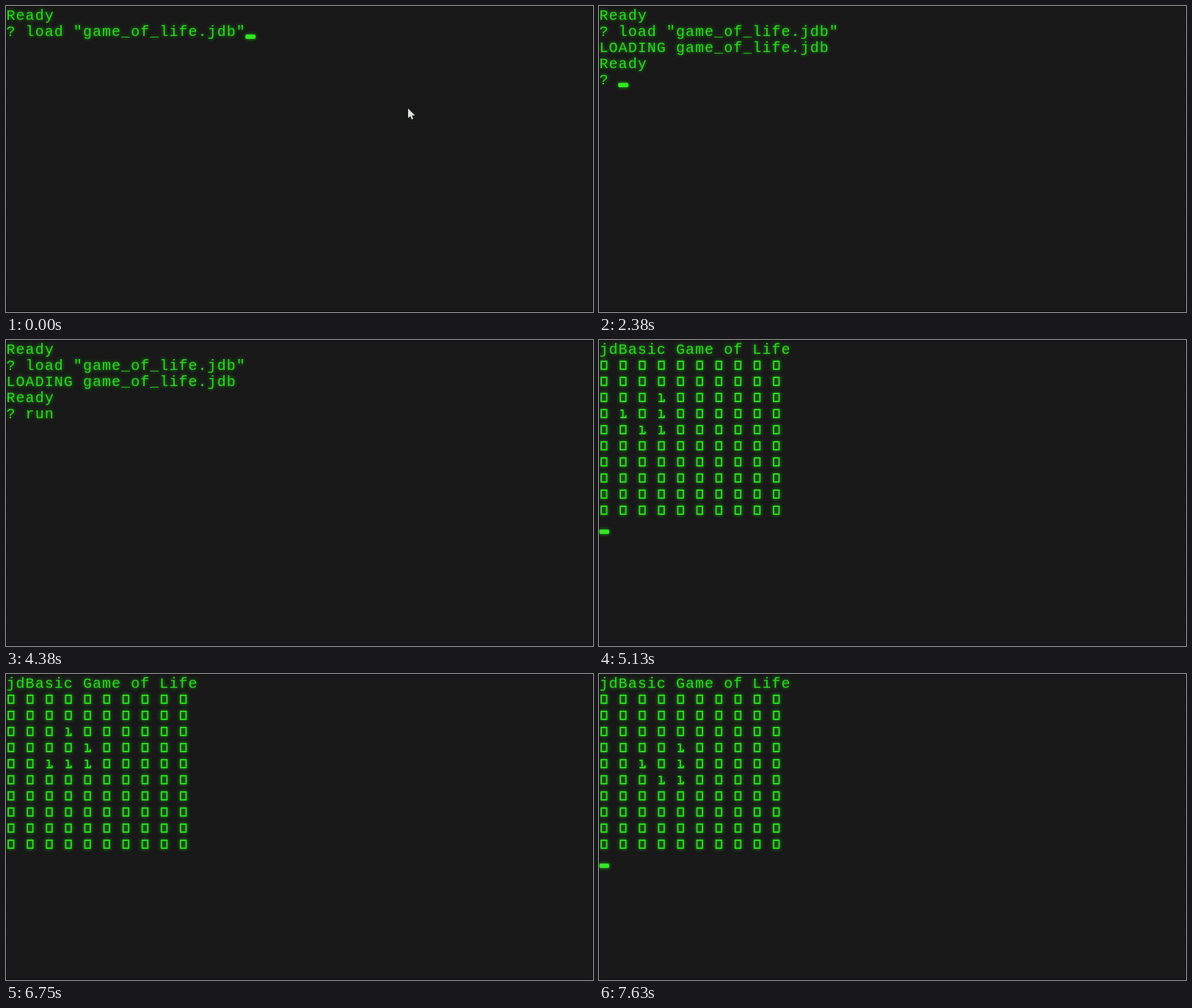
Animation, 800 px wide and 418 px high, one loop 8000 ms. Source, as an HTML page with a canvas:

```html
<!DOCTYPE html>
<html lang="en">
<head>
<meta charset="utf-8">
<title>Game of Life terminal</title>
<style>
html, body { margin: 0; width: 100%; height: 100%; overflow: hidden; background: #181818; }
canvas { display: block; }
</style>
</head>
<body>
<canvas id="screen" width="800" height="418"></canvas>
<script>
const ctx = document.getElementById('screen').getContext('2d');
const LOOP = 8000, COL = 13.05, ROW = 22, SIZE = 10;
const ENTER = 1125, LOADED = 2000, RUN = 4875, STEP = 680;
const KEYS = [3000, 3250, 3500];
// Cursor starts visible and flips at each of these times.
const BLINKS = [125, 625, 1125, 2125, 2625, 3125, 3625, 3875, 4375, 4875,
  5375, 5875, 6375, 6875, 7125, 7625];
const GLIDER = ['2,3', '3,1', '3,3', '4,2', '4,3'];

const passed = (times, t) => times.filter(x => x <= t).length;

function nextGen(cells) {
  return cells.map((line, r) => line.map((alive, c) => {
    let n = -alive;
    for (let y = -1; y < 2; y++)
      for (let x = -1; x < 2; x++)
        n += cells[(r + y + SIZE) % SIZE][(c + x + SIZE) % SIZE];
    return +(n === 3 || (alive && n === 2));
  }));
}

const gens = [Array.from({ length: SIZE }, (_, r) =>
  Array.from({ length: SIZE }, (_, c) => +GLIDER.includes(r + ',' + c)))];
while (gens.length < 5) gens.push(nextGen(gens.at(-1)));

function write(text, row) {
  ctx.fillText(text, 0.5, row * ROW + 19);
}

function digit(value, row, col) {
  const x = col * COL + 3, y = row * ROW + 7;
  ctx.beginPath();
  if (value) {
    ctx.moveTo(x, y + 1);
    ctx.lineTo(x + 3.5, y + 1);
    ctx.lineTo(x + 3.5, y + 11);
    ctx.moveTo(x, y + 11);
    ctx.lineTo(x + 7.5, y + 11);
    ctx.lineTo(x + 7.5, y + 8);
  } else {
    ctx.rect(x, y, 7.5, 11);
  }
  ctx.stroke();
}

function cursor(row, col) {
  ctx.fillStyle = '#3bff2b';
  ctx.beginPath();
  ctx.roundRect(col * COL, row * ROW + 17, 14, 6, 2);
  ctx.fill();
}

function pointer() {
  ctx.shadowBlur = 0;
  ctx.fillStyle = '#f2fff0';
  ctx.fill(new Path2D('M548 140V153L551 150.5L553 155L555 154L553 149.5H557.5Z'));
}

function scanlines() {
  ctx.shadowBlur = 0;
  ctx.fillStyle = 'rgba(0,0,0,.2)';
  for (let y = 0; y < 418; y += 2) ctx.fillRect(0, y, 800, 1);
  ctx.lineWidth = 2;
  ctx.strokeStyle = 'rgba(0,0,0,.45)';
  ctx.strokeRect(0, 0, 800, 418);
}

function draw(t) {
  ctx.shadowBlur = 0;
  ctx.fillStyle = '#1b1b1b';
  ctx.fillRect(0, 0, 800, 418);
  ctx.font = '20px "Liberation Mono", monospace';
  ctx.letterSpacing = '1.05px';
  ctx.fillStyle = ctx.strokeStyle = '#35ea28';
  ctx.shadowColor = '#20c818';
  ctx.shadowBlur = 5;
  ctx.lineWidth = 2;
  ctx.lineJoin = 'round';

  let place;
  if (t < RUN) {
    const lines = ['Ready', '? load "game_of_life.jdb"'];
    if (t >= ENTER) lines.push('LOADING game_of_life.jdb');
    if (t >= LOADED) lines.push('Ready', '? ' + 'run'.slice(0, passed(KEYS, t)));
    lines.forEach(write);
    place = [lines.length - 1, lines.at(-1).length];
  } else {
    write('jdBasic Game of Life', 0);
    gens[Math.floor((t - RUN) / STEP)].forEach((line, r) =>
      line.forEach((v, c) => digit(v, r + 1, c * 2)));
    place = [11, 0];
  }
  if (passed(BLINKS, t) % 2 === 0) cursor(...place);
  if (t < ENTER) pointer();
  scanlines();
}

const start = performance.now();
function tick() {
  draw((performance.now() - start) % LOOP);
  requestAnimationFrame(tick);
}
tick();
</script>
</body>
</html>
```
